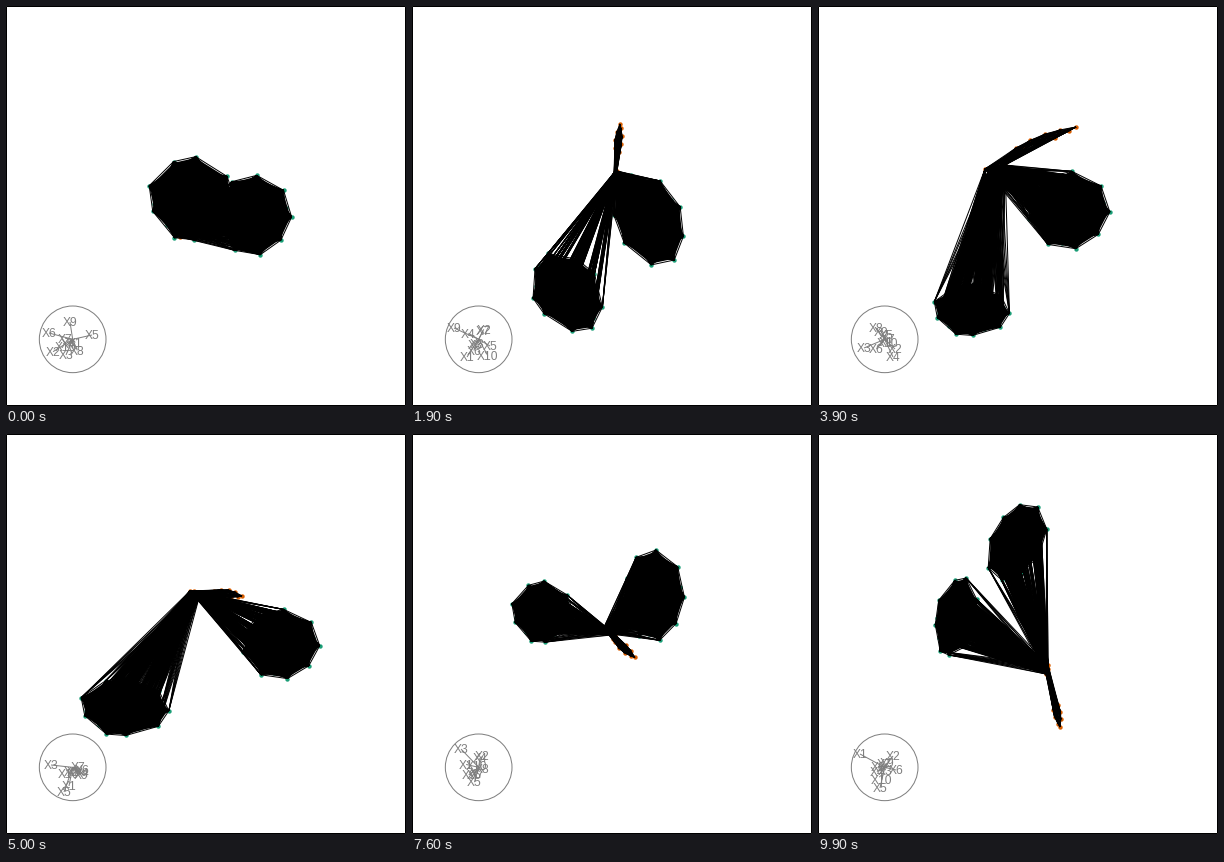
These frames come from a looping animation (400x400 px, 10 s). A matplotlib script:

```python
"""Tour of ten variables: two dense clusters joined through a small bridge."""
from itertools import combinations, product

import matplotlib.pyplot as plt
import numpy as np
from matplotlib.animation import FuncAnimation
from matplotlib.collections import LineCollection, PolyCollection
from matplotlib.patches import Circle, Rectangle

SIZE, DPI, STEPS, STEP_MS = 400, 100, 100, 100
PX = 72 / DPI
TEAL, ORANGE, GREY = "#1B9E77", "#D95F02", "#7f7f7f"
HUB, REACH = np.array([SIZE / 6, SIZE * 5 / 6]), SIZE / 12
CORNERS, INNER = 9, 38

# Clusters by step: centre x, centre y, half width, half height, turn in degrees.
LEFT = {
    0: (186, 193, 42, 40, 0),
    19: (155, 286, 41, 31, 50),
    39: (153, 304, 36, 25, 0),
    50: (118, 273, 42, 28, 0),
    64: (133, 196, 37, 31, 0),
    88: (128, 182, 23, 30, 0),
    99: (138, 183, 20, 38, 12),
}
RIGHT = {
    0: (248, 209, 35, 39, 0),
    19: (237, 213, 31, 47, -25),
    39: (251, 204, 38, 38, 0),
    50: (275, 210, 36, 34, 0),
    64: (262, 234, 29, 38, -10),
    77: (240, 156, 28, 44, 0),
    88: (210, 116, 26, 28, 0),
    94: (204, 98, 26, 37, 15),
    99: (199, 108, 24, 40, 28),
}
# Strands by step: both ends as x, y, x, y.
BRIDGE = {
    0: (174, 231, 185, 222),
    19: (202, 168, 205, 165),
    39: (167, 163, 187, 159),
    50: (184, 157, 194, 160),
    64: (175, 157, 187, 164),
    88: (215, 233, 223, 234),
    99: (228, 240, 230, 231),
}
TAIL = {
    0: (200, 205, 212, 205),
    19: (205, 150, 208, 118),
    28: (210, 135, 237, 102),
    39: (198, 142, 258, 121),
    50: (208, 157, 236, 162),
    64: (180, 158, 187, 164),
    88: (231, 254, 263, 284),
    99: (236, 264, 242, 293),
}
# Leading variables by step; the others hover near the hub.
LEADS = {
    0: {9: (64, 316), 6: (43, 327), 5: (86, 329), 3: (60, 349)},
    19: {9: (42, 322), 1: (55, 351), 5: (78, 340), 7: (71, 325)},
    39: {8: (58, 322), 4: (75, 351), 3: (46, 342), 2: (77, 343)},
    50: {5: (58, 358), 1: (63, 352), 3: (45, 331), 4: (76, 339)},
    64: {3: (46, 316), 4: (76, 322), 5: (63, 350), 6: (49, 334)},
    88: {1: (41, 328), 2: (77, 317), 5: (61, 350), 3: (56, 323)},
    99: {1: (42, 320), 2: (75, 322), 5: (62, 354), 6: (78, 336)},
}

rng = np.random.default_rng(4)


def track(poses):
    """Return a function of time that glides smoothly through the poses."""
    t = np.array(list(poses), float)
    p = np.array(list(poses.values()), float)
    v = np.gradient(p, t, axis=0)

    def at(now):
        k = min(np.searchsorted(t, now, side="right") - 1, len(t) - 2)
        h = t[k + 1] - t[k]
        u = (now - t[k]) / h
        return ((2 * u**3 - 3 * u**2 + 1) * p[k] + (u**3 - 2 * u**2 + u) * h * v[k]
                + (3 * u**2 - 2 * u**3) * p[k + 1] + (u**3 - u**2) * h * v[k + 1])

    return at


def make_blob():
    """Unit cluster: rim corners first, then inner points."""
    rim = (np.arange(CORNERS) + rng.uniform(-0.2, 0.2, CORNERS)) * 2 * np.pi / CORNERS
    angle = np.concatenate([rim, rng.uniform(0, 2 * np.pi, INNER)])
    radius = np.concatenate([rng.uniform(0.98, 1.08, CORNERS),
                             0.92 * np.sqrt(rng.uniform(0, 1, INNER))])
    return radius[:, None] * np.column_stack([np.cos(angle), np.sin(angle)])


def place(blob, pose):
    x, y, w, h, turn = pose
    c, s = np.cos(np.radians(turn)), np.sin(np.radians(turn))
    return (blob * (w, h)) @ np.array([[c, s], [-s, c]]) + (x, y)


def strand(pose, count, bulge):
    """Points between two ends, alternating to either side."""
    a, b = pose[:2], pose[2:]
    u = np.linspace(0, 1, count)[:, None]
    side = np.array([a[1] - b[1], b[0] - a[0]]) / np.hypot(*(b - a))
    sign = np.where(np.arange(count) % 2, 1, -1)[:, None]
    return a + u * (b - a) + bulge * sign * np.sin(np.pi * u) * side


def make_axes(leads):
    tips = HUB + rng.normal((-2, 3), (6, 6), (10, 2))
    for i, tip in leads.items():
        tips[i - 1] = tip
    return tips


def shrink(poly, k=0.97):
    mid = poly.mean(axis=0)
    return mid + k * (poly - mid)


blob_a, blob_b = make_blob(), make_blob()
left, right, bridge, tail = map(track, (LEFT, RIGHT, BRIDGE, TAIL))
axes = track({step: make_axes(leads) for step, leads in LEADS.items()})

fig = plt.figure(figsize=(SIZE / DPI, SIZE / DPI), dpi=DPI, facecolor="white")
ax = fig.add_axes([0, 0, 1, 1])
ax.set(xlim=(0, SIZE), ylim=(SIZE, 0))
ax.axis("off")

ax.add_patch(Rectangle((0.5, 0.5), SIZE - 1, SIZE - 1, fill=False, ec="black", lw=PX, snap=False))
ax.add_patch(Circle(HUB, REACH, fill=False, ec=GREY, lw=PX))
spokes = ax.add_collection(LineCollection([], colors=GREY, linewidths=PX))
labels = [ax.text(0, 0, f"X{i}", color=GREY, family="Liberation Sans",
                  size=12 * PX, ha="center", va="baseline") for i in range(1, 11)]

dot = dict(s=(4.4 * PX) ** 2, linewidths=0, zorder=2)
teal_dots = ax.scatter([], [], c=TEAL, **dot)
orange_dots = ax.scatter([], [], c=ORANGE, **dot)
bodies = ax.add_collection(PolyCollection([], facecolors="black", edgecolors="none", zorder=3))
edges = ax.add_collection(LineCollection([], colors="black", linewidths=PX, zorder=4))


def draw(step):
    a, b = place(blob_a, left(step)), place(blob_b, right(step))
    c, d = strand(bridge(step), 6, 1), strand(tail(step), 9, 3.5)

    teal_dots.set_offsets(np.vstack([a, b]))
    orange_dots.set_offsets(np.vstack([c, d]))
    bodies.set_verts([shrink(a[:CORNERS]), shrink(b[:CORNERS])])
    links = [pair for group in (a, b, c, d) for pair in combinations(group, 2)]
    for group in (a, b, d):
        links += product(group, c)
    edges.set_segments(links)

    tips = axes(step)
    spokes.set_segments([(HUB, tip) for tip in tips])
    for label, (x, y) in zip(labels, tips):
        label.set_position((x, y + 4.3))
    return [teal_dots, orange_dots, bodies, edges, spokes, *labels]


anim = FuncAnimation(fig, draw, frames=STEPS, interval=STEP_MS, repeat=True, repeat_delay=0)
plt.show()
```
